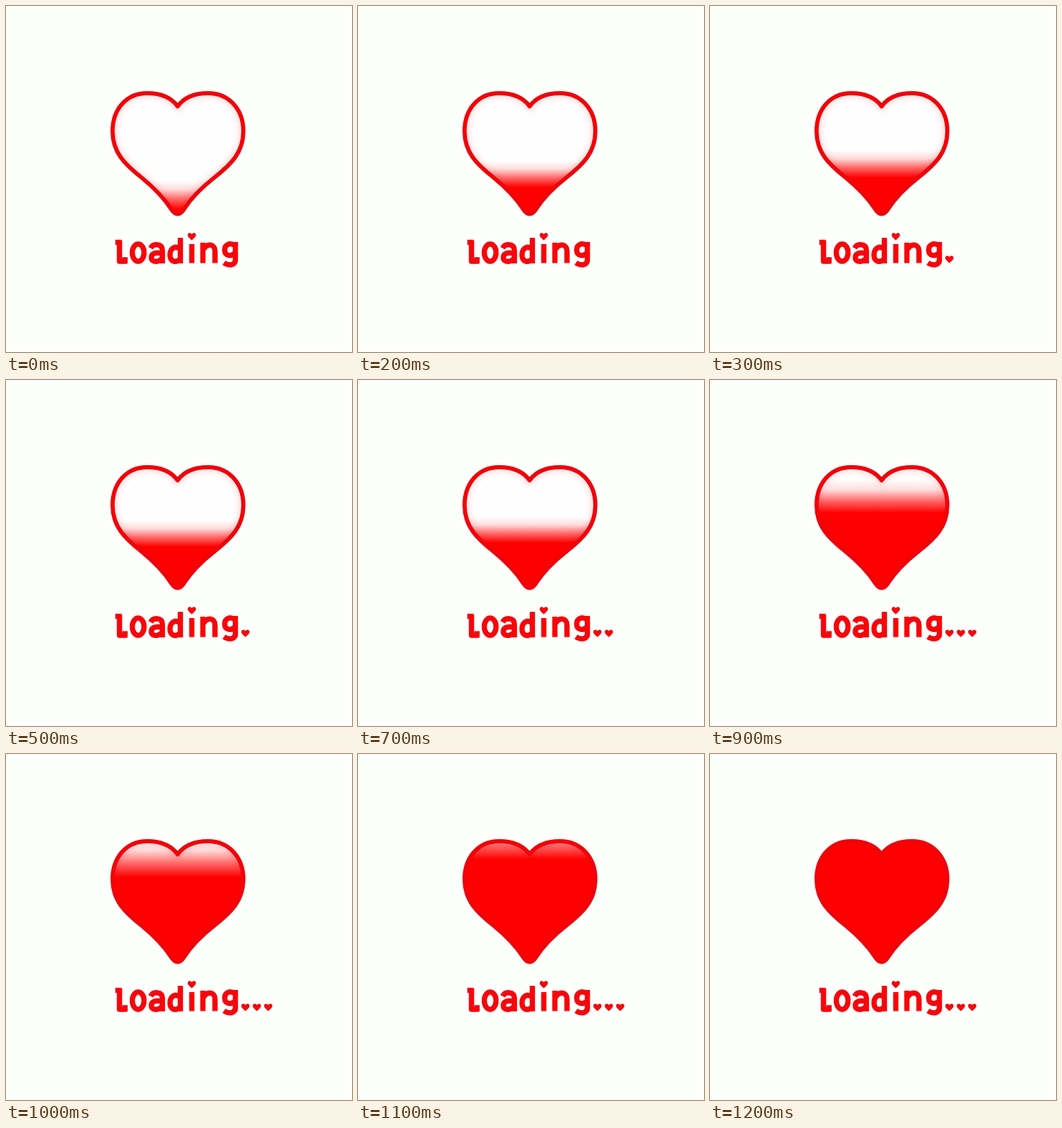
These frames come from a looping animation (500x500 px, 1300 ms). An HTML page:

```html
<!DOCTYPE html>
<html lang="en">
<head>
<meta charset="utf-8">
<title>Loading</title>
<style>
  html, body { margin: 0; width: 100%; height: 100%; overflow: hidden; background: #fdfffc; }
  svg { display: block; width: 100%; height: 100%; }
  .lettering { fill: none; stroke: #f6060c; stroke-width: 7.6; stroke-linejoin: round; }
  .hearts { fill: #f6060c; }
</style>
</head>
<body>
<svg viewBox="0 0 500 500" role="img" aria-label="Loading">
  <defs>
    <path id="heart" d="M248 145 C238 131 222 126 204 126 C174 126 154 149 154 181
      C154 212 172 229 196 248 C218 266 230 280 239 294 Q248 307 257 294
      C266 280 278 266 301 248 C325 229 343 212 343 181
      C343 149 322 126 292 126 C274 126 258 131 248 145Z"/>
    <path id="smallHeart" d="M0 5.5 C-3 2.5 -6 .5 -6 -2 C-6 -5.5 -1.5 -6 0 -3 C1.5 -6 6 -5.5 6 -2 C6 .5 3 2.5 0 5.5Z"/>
    <clipPath id="inside"><use href="#heart"/></clipPath>
    <filter id="soft" x="-20%" y="-20%" width="140%" height="140%"><feGaussianBlur stdDeviation="5"/></filter>
    <linearGradient id="level" gradientUnits="userSpaceOnUse" x1="0" x2="0">
      <stop offset="0" stop-color="#f00" stop-opacity="0"/>
      <stop offset=".3" stop-color="#f00" stop-opacity=".13"/>
      <stop offset=".65" stop-color="#f00" stop-opacity=".6"/>
      <stop offset="1" stop-color="#f00"/>
    </linearGradient>
  </defs>

  <use href="#heart" fill="#fffefe"/>
  <g clip-path="url(#inside)">
    <use href="#heart" fill="none" stroke="#f33" stroke-width="10" opacity=".2" filter="url(#soft)"/>
    <rect x="140" y="110" width="220" height="200" fill="url(#level)"/>
  </g>
  <use href="#heart" fill="none" stroke="#ee040a" stroke-width="6" stroke-linejoin="round"/>

  <g class="lettering">
    <path d="M158 341.5 H167 M164 339 V369 H174.5 M172 363 V372"/>
    <ellipse cx="191" cy="356.500" rx="8.500" ry="12.500"/>
    <path d="M209 350 Q212 344 219 345 Q226 346 226 353 V372 M226 358 C216 355 210 358 210 363.500 C210 371 221 371 226 364"/>
    <path d="M252 335 V372 M252 352 C245 345 237 350 237 359.500 C237 370 246 372 252 365"/>
    <path d="M268.500 344 V371.500"/>
    <path d="M284.500 342 V371.500 M285 352 C291 342 302 344 302 354 V371.500"/>
    <path d="M331.500 341 V366 C332 375 322 376 315 371 M331 346 C323 341 316 345 316 352.500 C316 361 325 363 331 357"/>
  </g>
  <g class="hearts">
    <use href="#smallHeart" x="268.500" y="333"/>
    <use class="dot" href="#smallHeart" x="346" y="366"/>
    <use class="dot" href="#smallHeart" x="362.500" y="366"/>
    <use class="dot" href="#smallHeart" x="379" y="366"/>
  </g>
</svg>
<script>
  const STEP = 100;
  // Top and bottom of the soft edge of the filling, one pair per step.
  const levels = [
    [252, 294], [240, 279], [224, 262], [208, 248], [206, 245], [203, 241], [201, 238],
    [198, 235], [164, 208], [144, 192], [122, 178], [98, 152], [60, 110]
  ];
  const level = document.getElementById('level');
  const dots = [...document.querySelectorAll('.dot')];

  function draw(time) {
    const step = Math.floor(time / STEP) % levels.length;
    const [top, bottom] = levels[step];
    level.setAttribute('y1', top);
    level.setAttribute('y2', bottom);
    const count = Math.min(3, Math.floor(step / 3));
    dots.forEach((dot, i) => dot.setAttribute('visibility', i < count ? 'visible' : 'hidden'));
  }

  const start = performance.now();
  function tick() {
    draw(performance.now() - start);
    requestAnimationFrame(tick);
  }
  tick();
</script>
</body>
</html>
```
